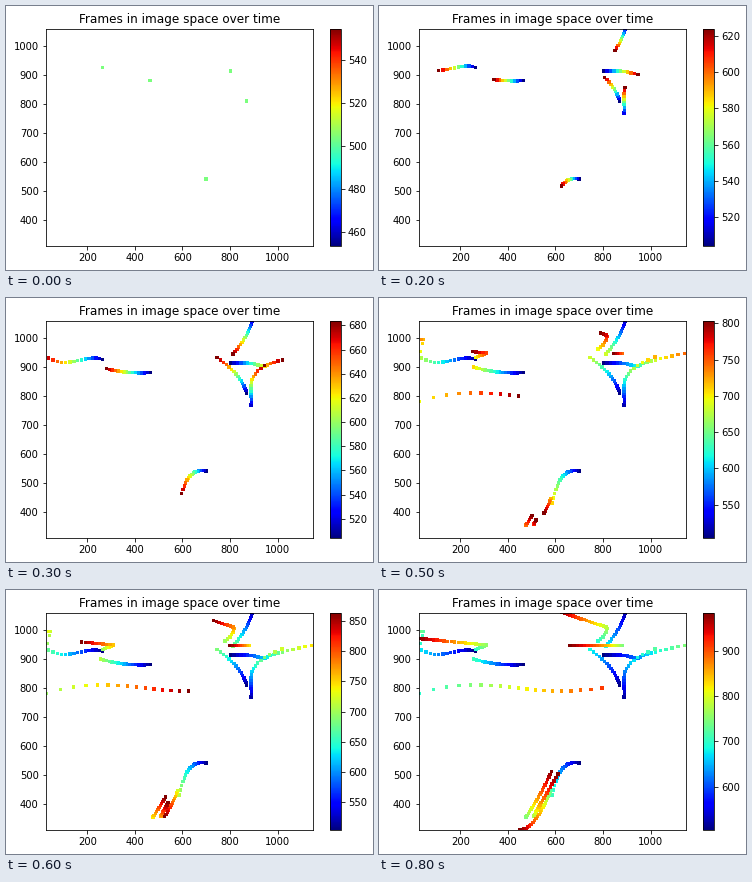
A matplotlib script that plays this animation: 367 by 264 pixels, repeating every 0.9 s.

```python
import matplotlib.pyplot as plt
import numpy as np
from matplotlib.animation import FuncAnimation

W, H, DPI = 367, 264, 72
LEFT, BOTTOM, AX_W, AX_H = 39.6, 24.0, 267.84, 217.44
XLIM, YLIM = (25, 1150), (310, 1060)
START, STEP, PER_FRAME, FRAMES = 504, 12, 5, 9

# First and last sample, then evenly spaced x and y nodes (stage pixels,
# y downwards) that a polynomial passes through.
TRACKS = [
    (0, 14, [96.5, 80.5, 62.5, 42.5], [61.5, 60.7, 64.3, 60]),
    (0, 17, [144, 94.5], [74.5, 74, 69]),
    (0, 10, [224.5, 259], [65.2, 65.2, 68.5]),
    (11, 20, [261.5, 279, 306], [66.9, 55.5]),
    (0, 15, [240.5, 231, 211], [95, 59.5]),
    (0, 17, [200, 185, 173], [173, 173.7, 183, 205]),
    (18, 40, [172, 160, 141], [200.5, 216, 232, 240]),
    (1, 15, [246, 239, 227], [23.5, 56]),
    (1, 18, [245, 244.8, 250, 276], [107, 59]),
    (16, 19, [41, 44, 42.5], [53.5, 42.7, 41.5]),
    (16, 20, [97, 105], [59.5, 56]),
    (21, 40, [107.5, 40.5], [55, 48.5]),
    (16, 34, [40, 112, 165, 223], [103.5, 94.8, 98, 101, 98]),
    (16, 22, [219, 225.5, 228], [51, 38.5]),
    (23, 40, [227, 180], [37, 21.5]),
    (17, 20, [238, 243], [55.5]),
    (21, 40, [241, 222, 191], [55.5]),
    (20, 40, [147, 159.5, 172.5], [227, 207, 181.5]),
    (22, 40, [155, 163.5, 179], [226, 210.5, 184]),
]


def curve(nodes, t):
    k = len(nodes)
    return np.polyval(np.polyfit(np.linspace(0, 1, k), nodes, k - 1), t)


def sample(first, last, xs, ys):
    idx = np.arange(first, last + 1)
    t = (idx - first) / (last - first)
    px, py = curve(xs, t), curve(ys, t)
    return np.column_stack([
        idx,
        XLIM[0] + (px - LEFT) / AX_W * (XLIM[1] - XLIM[0]),
        YLIM[0] + (H - BOTTOM - py) / AX_H * (YLIM[1] - YLIM[0]),
    ])


def box(x, y, w, h):
    return [x / W, y / H, w / W, h / H]


points = np.vstack([sample(*track) for track in TRACKS])
points = points[np.argsort(points[:, 0], kind="stable")]

fig = plt.figure(figsize=(W / DPI, H / DPI), dpi=DPI, facecolor="white")
ax = fig.add_axes(box(LEFT, BOTTOM, AX_W, AX_H))
cax = fig.add_axes(box(LEFT + AX_W + 16.74, BOTTOM, AX_H / 20, AX_H))
ax.set(xlim=XLIM, ylim=YLIM)
ax.set_title("Frames in image space over time")
dots = ax.scatter([0], [0], c=[START], s=12, marker="s", linewidths=0,
                  cmap="jet", vmin=START * 0.9, vmax=START * 1.1)
fig.colorbar(dots, cax=cax)


def update(frame):
    last = PER_FRAME * frame
    seen = points[points[:, 0] <= last]
    dots.set_offsets(seen[:, 1:])
    dots.set_array(START + STEP * seen[:, 0])
    if frame == 0:
        dots.set_clim(START * 0.9, START * 1.1)
    else:
        dots.set_clim(START, START + STEP * last)
    return (dots,)


anim = FuncAnimation(fig, update, frames=FRAMES, interval=100,
                     repeat=True, repeat_delay=0, blit=False)
plt.show()
```
